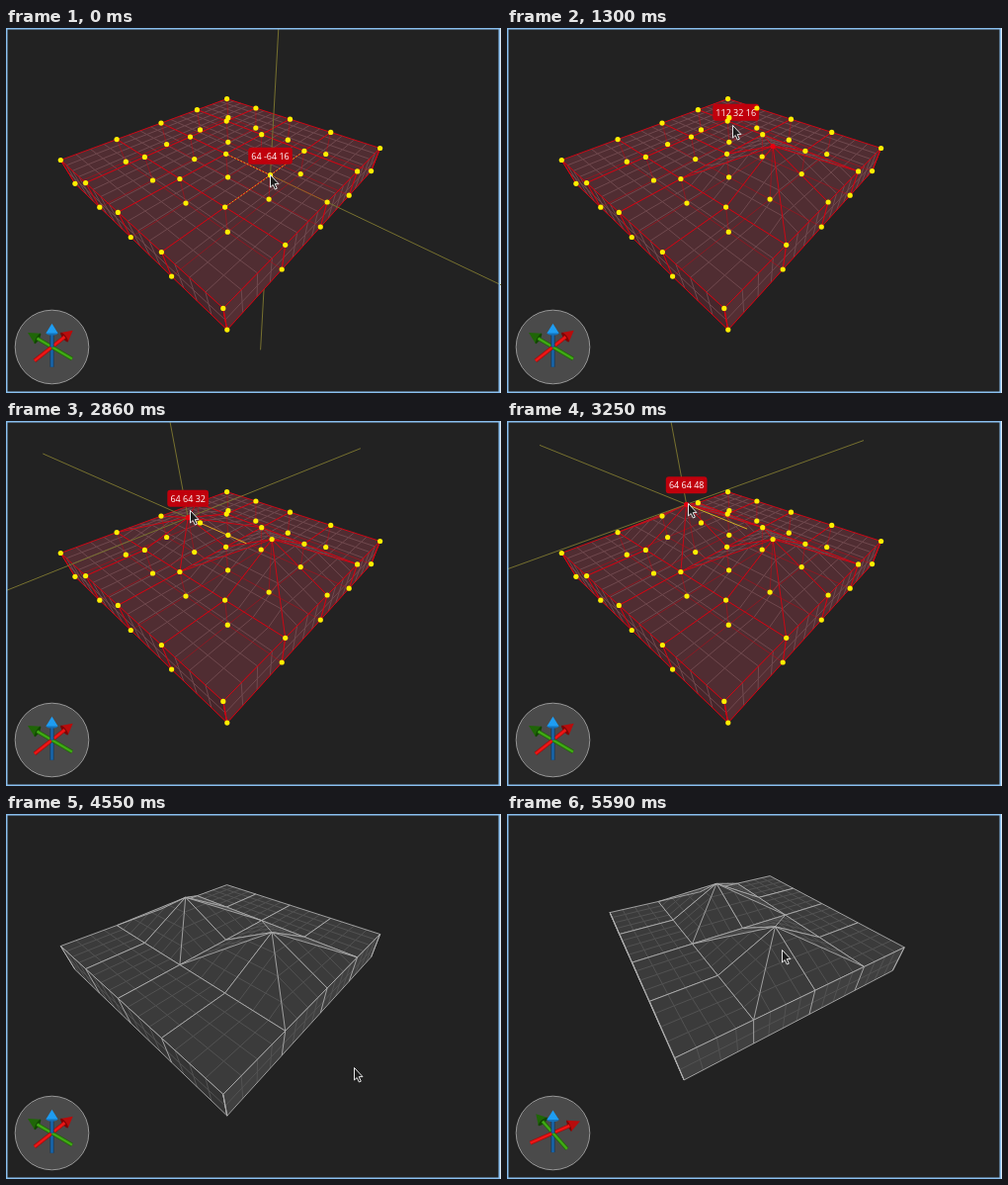
An HTML page that plays this animation: 501x369 px, repeating every 6590 ms.

```html
<!DOCTYPE html>
<html lang="en">
<head>
<meta charset="utf-8">
<title>Moving vertices</title>
<style>
html, body { margin: 0; width: 100%; height: 100%; overflow: hidden; background: #dcebf8; }
svg { display: block; }
text { font: 9px "Open Sans", "Noto Sans", sans-serif; fill: #fff; text-anchor: middle; }
</style>
</head>
<body>
<svg id="view" width="501" height="369" viewBox="0 0 501 369"></svg>
<script>
const LOOP = 6590, STEP = 130, FOCAL = 248, CX = 250.5, CY = 184.5;
const PIVOT = [0.137, -1.3], ARM = [-2.752, -1.606];
const PEAKS = [[0, -1], [0, 1]];
const view = document.getElementById("view");
let cam, lift;

const rad = d => d * Math.PI / 180;
const mix = (a, b, f) => a + (b - a) * f;
const clamp = x => Math.max(0, Math.min(1, x));
const fix = x => x.toFixed(1);

// Orbit around the pivot; one unit is 64 map units, w = 0 is the slab's top.
function setCamera(f) {
  const turn = rad(17.2 * f), yaw = rad(40.8) + turn, pitch = rad(mix(42.9, 44.75, f));
  const c = Math.cos(turn), s = Math.sin(turn);
  const cy = Math.cos(yaw), sy = Math.sin(yaw), cp = Math.cos(pitch), sp = Math.sin(pitch);
  cam = {
    pos: [PIVOT[0] + ARM[0] * c - ARM[1] * s, PIVOT[1] + ARM[0] * s + ARM[1] * c, mix(2.231, 2.326, f)],
    right: [sy, -cy, 0],
    down: [-sp * cy, -sp * sy, -cp],
    ahead: [cp * cy, cp * sy, -sp]
  };
}

const dot = (a, b) => a[0] * b[0] + a[1] * b[1] + a[2] * b[2];
const fromCam = p => p.map((x, i) => x - cam.pos[i]);
const depth = p => dot(fromCam(p), cam.ahead);

function project(p) {
  const d = fromCam(p), z = dot(d, cam.ahead);
  return [CX + FOCAL * dot(d, cam.right) / z, CY + FOCAL * dot(d, cam.down) / z];
}

const height = (u, v) => Math.max(...PEAKS.map(([a, b], i) =>
  lift[i] * Math.max(0, 1 - Math.max(Math.abs(u - a), Math.abs(v - b)))));
const top3 = (u, v) => [u, v, height(u, v)];

const path2 = pts => "M" + pts.map(p => fix(p[0]) + " " + fix(p[1])).join("L");
const path3 = pts => path2(pts.map(project));
const stroke = (d, color, width = 1, extra = "") =>
  `<path d="${d}" fill="none" stroke="${color}" stroke-width="${width}" ${extra}/>`;
const fill = (d, color, extra = "") => `<path d="${d}Z" fill="${color}" ${extra}/>`;
const disc = (p, r, color) => `<circle cx="${fix(p[0])}" cy="${fix(p[1])}" r="${r}" fill="${color}"/>`;

function cell(u, v, look) {
  const corners = [[u, v], [u + 1, v], [u + 1, v + 1], [u, v + 1]];
  const ring = corners.map(c => top3(...c));
  let grid = "", edges = path3(ring) + "Z";
  for (let i = 1; i < 4; i++) {
    const along = [], across = [];
    for (let q = 0; q < 5; q++) {
      along.push(top3(u + i / 4, v + q / 4));
      across.push(top3(u + q / 4, v + i / 4));
    }
    grid += path3(along) + path3(across);
  }
  ring.forEach((p, i) => {
    if (p[2] > 0) edges += path3([p, ring[(i + 2) % 4]]);
  });
  return fill(path3(ring), look.top) + stroke(grid, look.grid) + stroke(edges, look.edge, look.width);
}

function side(at, color, look) {
  let grid = path3([[...at(-2), -0.25], [...at(2), -0.25]]), edges = "";
  for (let i = -8; i <= 8; i++) {
    const line = path3([[...at(i / 4), 0], [...at(i / 4), -0.5]]);
    if (i % 4) grid += line; else edges += line;
  }
  const box = path3([[...at(-2), 0], [...at(2), 0], [...at(2), -0.5], [...at(-2), -0.5]]);
  return fill(box, color) + stroke(grid, look.grid) + stroke(box + "Z" + edges, look.edge, look.width);
}

function slab(selected) {
  const look = selected
    ? { top: "#502d32", left: "#46262b", front: "#542e33", grid: "#70494e", edge: "#cc0715", width: 1 }
    : { top: "#3b3b3b", left: "#343434", front: "#404040", grid: "#525252", edge: "#b2b2b2", width: 0.85 };
  const cells = [];
  for (let u = -2; u < 2; u++) for (let v = -2; v < 2; v++) cells.push([u, v]);
  const far = ([u, v]) => depth([u + 0.5, v + 0.5, 0]);
  cells.sort((a, b) => far(b) - far(a));
  return cells.map(c => cell(...c, look)).join("")
    + side(s => [-2, s], look.left, look) + side(s => [s, -2], look.front, look);
}

// Edges and vertical seams that show faintly through the selected faces.
function hiddenEdges() {
  let d = "";
  for (let a = -2; a <= 2; a++) {
    d += path3([[a, -2, -0.5], [a, 2, -0.5]]) + path3([[-2, a, -0.5], [2, a, -0.5]]);
    for (let b = -2; b <= 2; b++) d += path3([top3(a, b), [a, b, -0.5]]);
  }
  return stroke(d, "#d40010", 1, 'opacity="0.45"');
}

function handles(red) {
  let s = "";
  for (let u = 2; u >= -2; u--) for (let v = 2; v >= -2; v--) {
    const hot = red >= 0 && u === PEAKS[red][0] && v === PEAKS[red][1];
    s += disc(project([u, v, -0.5]), 2.6, "#ffee00");
    s += disc(project(top3(u, v)), 2.6, hot ? "#e80010" : "#ffee00");
  }
  return s;
}

function spike(p, axis, len, color, extra) {
  const end = l => p.map((x, i) => x + axis[i] * l);
  while (depth(end(len)) < 0.25) len -= 0.05;
  return stroke(path3([p, end(len)]), color, 1, extra);
}

function guides(i) {
  const [u, v] = PEAKS[i], p = top3(u, v), flush = p[2] === 0;
  const dim = "#77712f", lit = "#cfae25", dash = 'stroke-dasharray="2 1.5"';
  const out = [0, Math.sign(v), 0], back = [0, -Math.sign(v), 0];
  let s = spike(p, [0, 0, 1], 8, dim) + spike(p, out, 8, dim);
  for (const x of [[1, 0, 0], [-1, 0, 0]])
    s += flush ? spike(p, x, 1, lit, dash) : spike(p, x, 8, dim);
  if (flush) s += spike(p, back, 1, lit, dash);
  else s += i ? spike(p, back, 1.5, lit) : spike(p, back, 8, dim);
  return s;
}

function label(p) {
  const [x, y] = project(p), v = [64 + p[0] * 64, p[1] * 64, 16 + p[2] * 64].map(Math.round);
  const str = v.join(" "), w = [...str].reduce((n, c) => n + (c === " " ? 2.4 : c === "-" ? 2.9 : 5.15), 6);
  return `<rect x="${fix(x - w / 2)}" y="${fix(y - 28)}" width="${fix(w)}" height="17" rx="3" fill="#c0000c"/>`
    + `<text x="${fix(x)}" y="${fix(y - 16.2)}">${str}</text>`;
}

function compass() {
  const ox = 46.5, oy = 322.5, L = 30;
  const axes = [
    { i: 2, shaft: "#1a68ac", rim: "#0c3b66", cone: "#1e9df2", base: "#1472ba" },
    { i: 0, shaft: "#ee1616", rim: "#a80c0c", cone: "#b80c0c", base: "#7c0505" },
    { i: 1, shaft: "#3faa14", rim: "#23660a", cone: "#1f6607", base: "#114602" }
  ];
  const at = (a, k) => [ox + cam.right[a.i] * L * k, oy + cam.down[a.i] * L * k];
  const shaft = (a, k) => {
    const d = path2([[ox, oy], at(a, k)]);
    return stroke(d, a.rim, 4) + stroke(d, a.shaft, 2.4);
  };
  const cone = a => {
    const b = at(a, 0.64), t = at(a, 1.08), n = Math.hypot(t[0] - b[0], t[1] - b[1]);
    const nx = (b[1] - t[1]) / n * 6, ny = (t[0] - b[0]) / n * 6;
    const ang = Math.atan2(ny, nx) * 180 / Math.PI;
    const disk = `<ellipse rx="6" ry="${fix(3.2 * Math.abs(cam.ahead[a.i]))}" fill="${a.base}" `
      + `transform="translate(${fix(b[0])} ${fix(b[1])}) rotate(${fix(ang)})"/>`;
    const body = fill(path2([[b[0] + nx, b[1] + ny], t, [b[0] - nx, b[1] - ny]]), a.cone);
    return cam.ahead[a.i] > 0 ? body + disk : disk + body;
  };
  const [z, x, y] = axes;
  return `<circle cx="${ox}" cy="${oy}" r="37.3" fill="#4a4a4a" stroke="#969696"/>`
    + shaft(z, -0.92) + cone(x) + cone(y) + shaft(x, 0.66) + shaft(y, 0.66)
    + shaft(x, -0.9) + shaft(y, -0.9) + shaft(z, 0.66) + cone(z);
}

// Pointer stops: step, x, y
const STOPS = [[0, 267, 148], [2, 267, 148], [5, 268, 118], [7, 268, 118], [10, 228, 98], [11, 226, 98],
  [14, 187, 109], [18, 187, 109], [22, 186, 90], [24, 183, 83], [26, 183, 83], [29, 381, 298],
  [31, 381, 298], [35, 352, 256], [36, 352, 256], [38, 302, 141], [43, 278, 137]];

function pointer(k) {
  const n = STOPS.findIndex(s => s[0] >= k), b = STOPS[n < 0 ? STOPS.length - 1 : n];
  const a = n > 0 ? STOPS[n - 1] : b, f = a === b ? 0 : clamp((k - a[0]) / (b[0] - a[0]));
  return `<path d="M0.5 0.5V13L3.2 10.5L5.3 15L7.3 14.2L5.2 9.6H9Z" fill="#1c1c1c" stroke="#e4e4e4" `
    + `transform="translate(${fix(mix(a[1], b[1], f))} ${fix(mix(a[2], b[2], f))})"/>`;
}

const rise = (k, a, b) => k < a ? 0 : k < b ? 0.25 : 0.5;

function draw(k) {
  lift = [rise(k, 3, 5), rise(k, 20, 24)];
  setCamera(clamp((k - 38) / 5));
  const selected = k < 33;
  const drag = k < 7 ? 0 : k >= 18 && k < 26 ? 1 : -1;
  let s = '<rect width="500" height="369" fill="#222"/>';
  if (drag === 0 && lift[0] === 0) s += spike([0, -1, 0], [0, 0, -1], 8, "#77712f");
  s += slab(selected);
  if (selected) {
    s += hiddenEdges();
    if (drag >= 0) s += guides(drag);
    const red = k < 1 ? -1 : k < 18 ? 0 : 1;
    if (k >= 9 && k < 12) s += label([0.75, 0.5, 0]) + handles(red);
    else {
      s += handles(red);
      if (k < 8) s += label(top3(0, -1));
      if (k >= 13 && k < 27) s += label(top3(0, 1));
    }
  }
  s += compass() + pointer(k);
  s += '<rect x="0.75" y="0.75" width="498.5" height="367.5" fill="none" stroke="#8ac0f0" stroke-width="1.5"/>';
  view.innerHTML = s;
}

let shown = -1;
function tick() {
  const k = Math.min(43, Math.floor(performance.now() % LOOP / STEP));
  if (k !== shown) draw(shown = k);
  requestAnimationFrame(tick);
}
tick();
</script>
</body>
</html>
```
